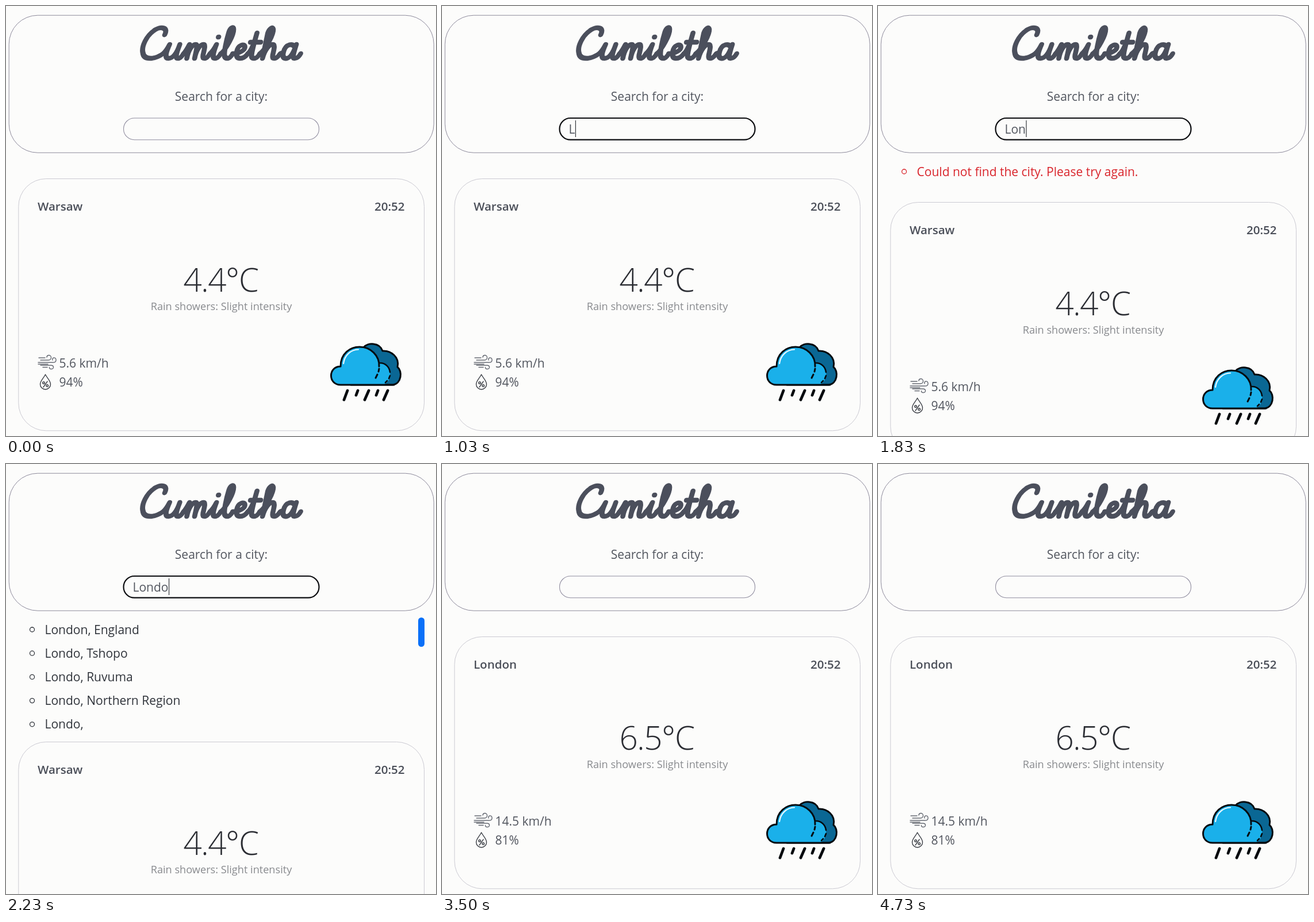
Animation, 748 px wide and 748 px high, one loop 4.81 s. Source, as an HTML page:

```html
<!DOCTYPE html>
<html lang="en">
<head>
<meta charset="utf-8">
<title>City weather</title>
<style>
  html, body { margin: 0; width: 100%; height: 100%; overflow: hidden; background: #fcfcfb; }
  svg { display: block; width: 100%; height: 100%; }
  text { font: 21px "Open Sans", "Noto Sans", sans-serif; fill: #52565f; }
  .bold { font-size: 20.5px; font-weight: 600; fill: #4b4f59; }
  .temp { font-size: 56.5px; font-weight: 300; letter-spacing: -1.4px; fill: #2b2d33; }
  .note { font-size: 18.15px; fill: #888a8e; }
  .mid { text-anchor: middle; }
  .row text { fill: #30343b; }
  .row circle { fill: none; stroke: #30343b; stroke-width: 1.3; }
  .error text { fill: #d9242b; }
  .error circle { stroke: #d9242b; }
  .line { fill: none; stroke-linecap: round; stroke-linejoin: round; }
</style>
</head>
<body>
<svg viewBox="0 0 748 748" id="stage">
  <rect width="748" height="748" fill="#fcfcfb"/>
  <rect x="5.2" y="16.2" width="739" height="239" rx="50" fill="none" stroke="#8d8a9b"/>
  <g id="word" class="line" role="img" aria-label="Cumiletha" stroke="#4b4f5c" stroke-width="8.4"
     transform="translate(232 91) scale(1.045 1) skewX(-10)"/>
  <text class="mid" x="374.5" y="165">Search for a city:</text>
  <rect id="box" x="204.5" y="195" width="340" height="37.7" rx="18.8" fill="none"/>
  <text id="typed" x="220.5" y="222"></text>
  <path id="squiggle" class="line" stroke="#e0383e" stroke-width="1.3"/>
  <path id="caret" stroke="#33363c" stroke-width="1.2"/>

  <g id="error" class="row error"></g>
  <g id="list" class="row">
    <rect id="hover" x="65" y="266" width="652" height="41.5" fill="#ededed"/>
    <rect x="717" y="267" width="11" height="51" rx="5.5" fill="#0a70f8"/>
  </g>

  <g id="card">
    <rect x="21.8" y="300.5" width="705.7" height="438.3" rx="48" fill="none" stroke="#cbcad2"/>
    <text id="city" class="bold" x="55" y="356"></text>
    <text class="bold" x="693.5" y="356" text-anchor="end">20:52</text>
    <text id="temp" class="temp mid" x="373.5" y="497"></text>
    <text class="note mid" x="374.5" y="529">Rain showers: Slight intensity</text>
    <text id="wind" x="92.5" y="629"></text>
    <text id="humid" x="92.5" y="662"></text>

    <g class="line" stroke="#666a73" stroke-width="1.4">
      <path d="M57 612H68M60 616H74C80 616 80 607 74 607.5Q71 608 71 611"/>
      <path d="M56 620H82C89 620 88 611 83 612Q80 613 81 616"/>
      <path d="M60 625H78C84 625 84 632 78 631.5Q75 631 75.5 628.5M56 623H73M64 628.5H72"/>
    </g>
    <g class="line" stroke="#3c3f46" stroke-width="1.4">
      <path d="M68.5 641C65 648 59.5 652 59.5 658A9 9 0 0 0 77.5 658C77.5 652 72 648 68.5 641Z"/>
      <path d="M72 653L65 663"/>
      <circle cx="65.5" cy="655.5" r="1.8"/><circle cx="71.7" cy="660.6" r="1.8"/>
    </g>

    <g class="line" stroke="#050a0e" stroke-width="3">
      <path fill="#0a6794" d="M622 594C629 585 650 585 655 600C670 599 685 611 681 628C690 635 688 657 673 659H600Z"/>
      <path fill="#1ab0ea" stroke="none" d="M582 659C559 659 560 627 582 627C582 604 599 593 615 593C632 593 648 604 650 621C662 621 670 632 668 643C667 653 660 659 653 659Z"/>
      <path d="M675 659H582C560 659 560 627 582 627C582 604 599 593 615 593C634 593 650 608 649 627"/>
      <path d="M649 631L648 636M646 641L643 647"/>
      <path d="M651 621C660 621 667 628 668 637M668 643L666 648M663 652L660 655" stroke-width="2.6"/>
      <path d="M587 622C589 607 600 598 613 597.5" stroke="#e9f8ff" stroke-width="2.2"/>
      <path d="M594 669L588 685M612 669L609 677M631 669L624 685M647 669L644 677M664 669L657 685" stroke-width="4.8"/>
    </g>
  </g>
</svg>
<script>
const LOOP = 4810;
const NS = "http://www.w3.org/2000/svg";
const $ = id => document.getElementById(id);

function add(parent, tag, attrs, text = "") {
  const el = document.createElementNS(NS, tag);
  for (const k in attrs) el.setAttribute(k, attrs[k]);
  el.textContent = text;
  parent.append(el);
  return el;
}
const show = (id, on) => $(id).setAttribute("visibility", on ? "visible" : "hidden");

// Script lettering: [path, advance], joined at y = -8
const glyphs = {
  C: ["M35-41C39-53 27-56 18-50C4-40 0-20 4-10C8 4 26 2 38-8", 38],
  u: ["M0-8Q5-14 8-24C4-8 4 0 11 0C18 0 23-10 25-24C22-8 21 0 27 0Q31 0 34-8", 34],
  m: ["M0-8Q4-14 7-24V0C7-14 12-24 17-24C22-24 20-12 20 0C20-14 25-24 30-24C35-24 33-12 33-6Q33 0 37 0Q41 0 44-8", 44],
  i: ["M0-8Q5-14 8-24C5-8 5 0 10 0Q15 0 18-8M9-37h.5", 18],
  l: ["M0-8C8-16 16-40 14-50C13-56 8-54 7-46C5-30 5-10 7-4Q9 0 13 0Q17 0 20-8", 20],
  e: ["M0-8C10-8 20-14 18-20C16-26 6-24 6-12C6-2 10 0 14 0Q21 0 25-8", 25],
  t: ["M0-8Q7-16 9-44C7-24 6-10 7-4Q8 0 12 0Q17 0 20-8M1-28H18", 20],
  h: ["M0-8C10-18 17-42 15-50C13-56 8-52 7-44L6 0C7-14 13-24 18-24C24-24 22-12 22-6Q22 0 26 0Q30 0 34-8", 34],
  a: ["M0-8L5-11M22-20C18-26 6-26 5-11C4 3 14 2 18-4Q22-10 24-24C22-8 21 0 26 0Q31 0 34-8", 34]
};
let pen = 0;
for (const ch of "Cumiletha") {
  const [d, advance] = glyphs[ch];
  add($("word"), "path", { d, transform: `translate(${pen} 0)` });
  pen += advance;
}

function addRow(group, i, text) {
  const y = 288 + 41.2 * i;
  add(group, "circle", { cx: 45.5, cy: y, r: 4 });
  add(group, "text", { x: 67.5, y: y + 7.5 }, text);
}
addRow($("error"), 0, "Could not find the city. Please try again.");
["London, England", "Londo, Tshopo", "Londo, Ruvuma", "Londo, Northern Region", "Londo,"]
  .forEach((name, i) => addRow($("list"), i, name));

let wave = "M222 227";
for (let x = 224, i = 0; x <= 282; x += 2.5, i++) wave += `L${x} ${i % 2 ? 227 : 224}`;
$("squiggle").setAttribute("d", wave);

const FOCUS = 280, ERROR = 1230, LIST = 2060, SPELL = 2640, HOVER = 2850, PICK = 3450;
const keys = [950, 1350, 1640, 1840, 2040];
const places = [
  { city: "Warsaw", temp: "4.4°C", wind: "5.6 km/h", humid: "94%" },
  { city: "London", temp: "6.5°C", wind: "14.5 km/h", humid: "81%" }
];

function draw(t) {
  const picked = t >= PICK;
  const focused = t >= FOCUS && !picked;
  const failed = t >= ERROR && t < LIST;
  const listed = t >= LIST && !picked;
  const count = picked ? 0 : keys.filter(k => t >= k).length;
  const lastKey = count ? keys[count - 1] : FOCUS;

  $("box").setAttribute("stroke", focused ? "#0c0d10" : "#908d9f");
  $("box").setAttribute("stroke-width", focused ? 2.2 : 1.1);
  $("typed").textContent = "Londo".slice(0, count);
  const x = 221.5 + (count ? $("typed").getComputedTextLength() : 0);
  $("caret").setAttribute("d", `M${x} 199V228`);
  show("caret", focused && (t - lastKey) % 1000 < 500);
  show("squiggle", t >= SPELL && !picked);
  show("error", failed);
  show("list", listed);
  show("hover", listed && t >= HOVER);

  $("card").setAttribute("transform", `translate(0 ${listed ? 183 : failed ? 41 : 0})`);
  const place = places[+picked];
  for (const id in place) $(id).textContent = place[id];
}

const start = performance.now();
function tick() {
  draw((performance.now() - start) % LOOP);
  requestAnimationFrame(tick);
}
tick();
</script>
</body>
</html>
```
